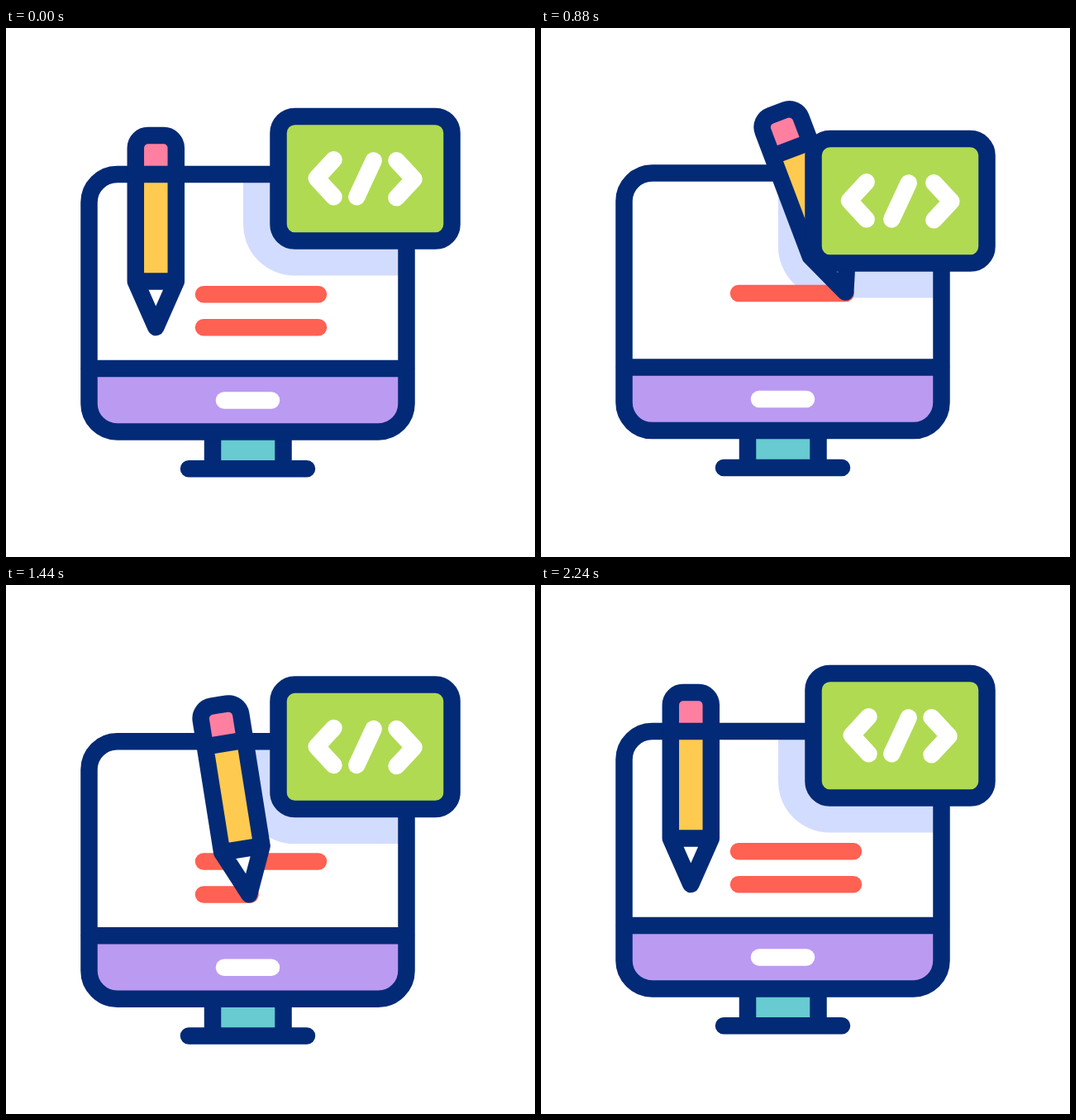
Recreate the animation shown at these times as an HTML page. Size 640 by 640 pixels, loop 2.28 s.

```html
<!DOCTYPE html>
<html lang="en">
<head>
<meta charset="utf-8">
<title>Web design</title>
<style>
  html, body { margin: 0; width: 100%; height: 100%; overflow: hidden; background: #fff; }
  svg { display: block; width: 100%; height: 100%; }
  .ink { stroke: #032a76; stroke-width: 20.5; stroke-linecap: round; stroke-linejoin: round; fill: none; }
  .white { stroke: #fff; }
  .red { stroke: #ff6152; }
</style>
</head>
<body>
<svg viewBox="0 0 640 640">
  <clipPath id="screen"><rect x="100" y="177" width="384" height="230"/></clipPath>
  <clipPath id="chin"><rect x="100" y="412" width="385" height="77"/></clipPath>
  <g id="scene">
    <g clip-path="url(#screen)">
      <rect id="shadow" x="287" y="65" width="295" height="234.5" rx="62" fill="#d2dcfe"/>
    </g>
    <rect x="250" y="488" width="85" height="45" fill="#67cbd1"/>
    <path class="ink" d="M250 488V533M335.5 488V533M221 533.3H364"/>
    <rect x="100.5" y="177" width="384" height="311.500" rx="34" fill="#bb9af2" clip-path="url(#chin)"/>
    <rect class="ink" x="100.5" y="177" width="384" height="311.500" rx="34"/>
    <path class="ink" d="M101 412H484"/>
    <path class="ink white" d="M264 450.5H321"/>
    <path id="line1" class="ink red"/>
    <path id="line2" class="ink red"/>

    <!-- pencil, drawn around its tip -->
    <g id="pencil">
      <path fill="#fff" d="M-24.5-55.5H24.5L0 0z"/>
      <path fill="#ffca50" d="M-24.5-185H24.5V-55.5H-24.5z"/>
      <path fill="#ff7fa0" d="M-24.5-185V-217a15 15 0 0 1 15-15H9.5a15 15 0 0 1 15 15V-185z"/>
      <path class="ink" d="M-24.5-55.5V-217a15 15 0 0 1 15-15H9.5a15 15 0 0 1 15 15V-55.5L0 0zH24.5M-24.5-185H24.5"/>
    </g>

    <g id="card">
      <rect class="ink" x="329.5" y="107" width="210" height="150.5" rx="20" style="fill:#b0da52"/>
      <path id="left" class="ink white" d="M396.5 159.3l-20.8 22.5l20.8 22.5"/>
      <path class="ink white" d="M444.7 160.5L424.3 204.3"/>
      <path id="right" class="ink white" d="M472.5 160.3l21 22.5l-21 22.5"/>
    </g>
  </g>
</svg>
<script>
const LOOP = 2280, STEP = 40;
const el = id => document.getElementById(id);

const move = (id, x, y, turn = 0) =>
  el(id).setAttribute("transform", `translate(${x} ${y}) rotate(${turn})`);

function drawLine(id, y, part) {
  el(id).setAttribute("d", part > 0.001 ? `M239 ${y}h${139 * part}` : "");
}

function draw() {
  const t = Math.floor(performance.now() % LOOP / STEP) * STEP;

  // Eased progress from 0 to 1 between two times.
  const ease = (from, to) => {
    const p = Math.min(1, Math.max(0, (t - from) / (to - from)));
    return (1 - Math.cos(Math.PI * p)) / 2;
  };

  // Everything bobs down, up, down and settles.
  move("scene", 0, 12.5 * (ease(330, 645) - ease(1460, 1780))
    - 27.3 * (ease(645, 1110) - ease(1110, 1460)));

  // The card swings on top of that, a little less each time.
  const swing = 29 * ease(500, 855) - 49.4 * ease(855, 1225)
    + 35.4 * ease(1225, 1600) - 15 * ease(1600, 1900);
  move("card", 0, swing);
  move("shadow", 0, swing);

  const spread = 21 * (ease(0, 500) - ease(500, 1000));
  move("left", -spread, 0);
  move("right", spread, 0);

  // The pencil writes both lines and goes home.
  const approach = ease(0, 530), write1 = ease(530, 950), back = ease(950, 1255);
  const write2 = ease(1255, 1675), home = ease(1675, 2240);
  const along = write1 - back + write2;
  move("pencil",
    181.3 + 55.4 * approach + 141 * along - 196.4 * home,
    362 - 41 * (approach - back),
    -22.2 * (along - home));

  const erased = ease(0, 420);
  drawLine("line1", 322.3, 1 - erased + write1);
  drawLine("line2", 362.2, 1 - erased + write2);
  requestAnimationFrame(draw);
}
draw();
</script>
</body>
</html>
```
